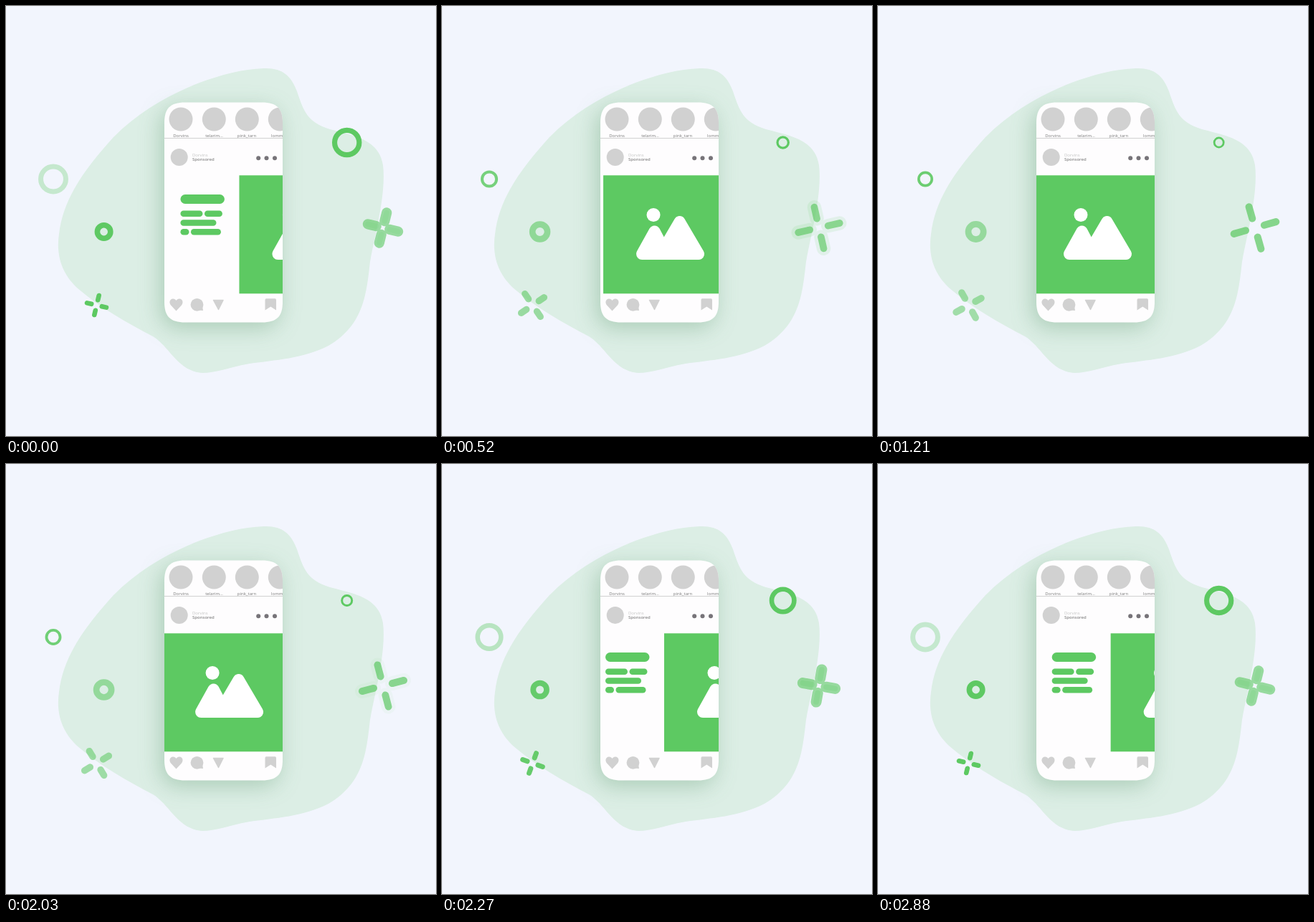
Animation, 600 px wide and 600 px high, one loop 2970 ms. Source, as an HTML page without scripts:

```html
<!DOCTYPE html>
<html lang="en">
<head>
<meta charset="utf-8">
<title>Social post carousel</title>
<style>
  /* --r: 0 = picture slide, 1 = text slide */
  @property --r { syntax: "<number>"; inherits: true; initial-value: 1; }

  html, body { margin: 0; width: 100%; height: 100%; overflow: hidden; background: #f2f5fd; }
  svg { display: block; width: 100vw; height: 100vh; animation: swipe 2970ms linear infinite; }

  @keyframes swipe {
    0% { --r: .995; }
    4.04%, 9.04% { --r: 1; }
    9.07% { --r: .28; }
    10.1% { --r: .205; }
    13.5% { --r: .15; }
    17.5% { --r: .107; }
    26.6% { --r: .037; }
    40.7%, 68.3% { --r: 0; }
    68.33% { --r: .045; }
    69.3% { --r: .047; }
    69.34% { --r: .6; }
    71.7% { --r: .79; }
    76.43% { --r: .858; }
    79.1% { --r: .89; }
    85.86% { --r: .942; }
    96.97% { --r: .988; }
    100% { --r: .995; }
  }

  .green { fill: #5dc962; }
  .line { fill: none; stroke: #5dc962; stroke-linecap: round; }
  .grey { fill: #d1d1d1; }
  .phone { filter: drop-shadow(-5px 8px 15px rgba(60, 130, 80, .3)); }
  .slides { transform: translateX(calc(213px + var(--r) * 113px)); }

  .ring-left { transform: scale(calc(.524 + var(--r) * .476)); opacity: calc(.9 - var(--r) * .6); }
  .ring-right { transform: scale(calc(.38 + var(--r) * .62)); }
  .ring-small { transform: scale(calc(1.15 - var(--r) * .15)); opacity: calc(.55 + var(--r) * .45); }
  .star-big { transform: rotate(calc(-16deg + var(--r) * 30deg)) scale(calc(1 - var(--r) * .29)); }
  .halo { opacity: min(.6, var(--r) * 1.1); }
  .arms { opacity: calc(.72 - var(--r) * .6); }
  .star-small {
    transform: rotate(calc(-29deg - var(--r) * 48deg)) scale(calc(1 - var(--r) * .31));
    opacity: calc(.54 + var(--r) * .46);
  }

  text { font-family: "Open Sans", "Noto Sans", sans-serif; font-size: 6px; fill: #777; }
  .story { text-anchor: middle; }
  .bold { font-weight: 600; fill: #8a8a8a; }
  .pale { fill: #c4c4c4; }
</style>
</head>
<body>
<svg viewBox="0 0 600 600" xmlns="http://www.w3.org/2000/svg">
  <defs>
    <clipPath id="screen"><rect x="221" y="134.5" width="165" height="307"/></clipPath>
    <path id="body" d="M221 163C221 143 229 134.500 250 134.500H357C378 134.500 386 143 386 163V413C386 433 378 441.500 357 441.500H250C229 441.500 221 433 221 413Z"/>
    <clipPath id="shape"><use href="#body"/></clipPath>
    <path id="cross" d="M0-13.500V-30.500M13.500 0H30.500M0 13.500V30.500M-13.500 0H-30.500"/>
  </defs>

  <rect width="600" height="600" fill="#f2f5fd"/>
  <path fill="#dceee5" d="M360 87C385 86 398 97 406 119C415 146 420 162 452 172C486 181 520 186 526 222C531 262 514 322 508 357C503 400 500 445 450 474C415 492 375 494 340 499C315 503 295 512 274 512C240 510 228 475 205 461C170 443 130 420 100 394C76 372 70 345 74 318C80 265 115 222 150 183C185 148 225 125 270 107C300 96 330 88 360 87Z"/>

  <g class="phone"><use href="#body" fill="#fefdfe"/></g>
  <g clip-path="url(#shape)">
    <g class="grey">
      <circle cx="244" cy="158" r="16.500"/>
      <circle cx="290.300" cy="158" r="16.500"/>
      <circle cx="336.300" cy="158" r="16.500"/>
      <circle cx="382.300" cy="158" r="16.500"/>
      <rect x="221" y="184" width="165" height="1"/>
      <circle cx="241.700" cy="211" r="12"/>
    </g>
    <text class="story" x="244" y="183">Dorvins</text>
    <text class="story" x="290.500" y="183">telarim...</text>
    <text class="story" x="336" y="183">pink_tarn</text>
    <text x="370" y="183">lomm</text>
    <text class="pale" x="260" y="210">Dorvins</text>
    <text class="bold" x="260" y="215.500">Sponsored</text>
    <g fill="#777479">
      <circle cx="352.200" cy="212.300" r="3"/>
      <circle cx="363.500" cy="212.300" r="3"/>
      <circle cx="375" cy="212.300" r="3"/>
    </g>

    <g class="slides">
      <g class="green">
        <rect x="-82" y="263" width="61.500" height="13" rx="6.500"/>
        <rect x="-82" y="285.500" width="31" height="8.500" rx="4.250"/>
        <rect x="-48.500" y="285.500" width="25" height="8.500" rx="4.250"/>
        <rect x="-82" y="298.300" width="50" height="8.500" rx="4.250"/>
        <rect x="-82" y="311" width="12" height="8.500" rx="4.250"/>
        <rect x="-67.500" y="311" width="42" height="8.500" rx="4.250"/>
        <rect y="236.300" width="200" height="165"/>
      </g>
      <g fill="#fff" stroke="#fff" stroke-width="16" stroke-linejoin="round">
        <circle cx="70" cy="291.500" r="9.500" stroke="none"/>
        <path d="M54 346L71.500 314.500L88 346Z"/>
        <path d="M80 346L106.500 301L133 346Z"/>
      </g>
    </g>

    <g class="grey">
      <path d="M237.500 425.500L230 417.500C227 414 228.500 408.500 233 408.500C235.500 408.500 237 410 237.500 411C238 410 239.500 408.500 242 408.500C246.500 408.500 248 414 245 417.500Z"/>
      <circle cx="266.500" cy="416.800" r="8.900"/>
      <path d="M274 418L275 425L267 424.500Z"/>
      <path d="M289.500 410.500H303L296.500 423.500Z" stroke="#d1d1d1" stroke-width="1.500" stroke-linejoin="round"/>
      <path d="M361.500 410Q361.500 408.300 363.200 408.300H375.300Q377 408.300 377 410V424.500L369.300 419.500L361.500 424.500Z"/>
    </g>
  </g>

  <g transform="translate(66 241.500)"><circle class="line ring-left" r="17.500" stroke-width="7"/></g>
  <g transform="translate(475.700 190.500)"><circle class="line ring-right" r="17.200" stroke-width="7.200"/></g>
  <g transform="translate(136.600 315)"><circle class="line ring-small" r="9.200" stroke-width="7.600"/></g>
  <g transform="translate(526 309.500)">
    <g class="line star-big">
      <g class="halo"><use href="#cross" stroke-width="20"/></g>
      <g class="arms"><use href="#cross" stroke-width="10"/></g>
    </g>
  </g>
  <g transform="translate(126.500 417.500)">
    <path class="line star-small" stroke-width="9.500" d="M0-10.800V-20M10.800 0H20M0 10.800V20M-10.800 0H-20"/>
  </g>
</svg>
</body>
</html>
```
